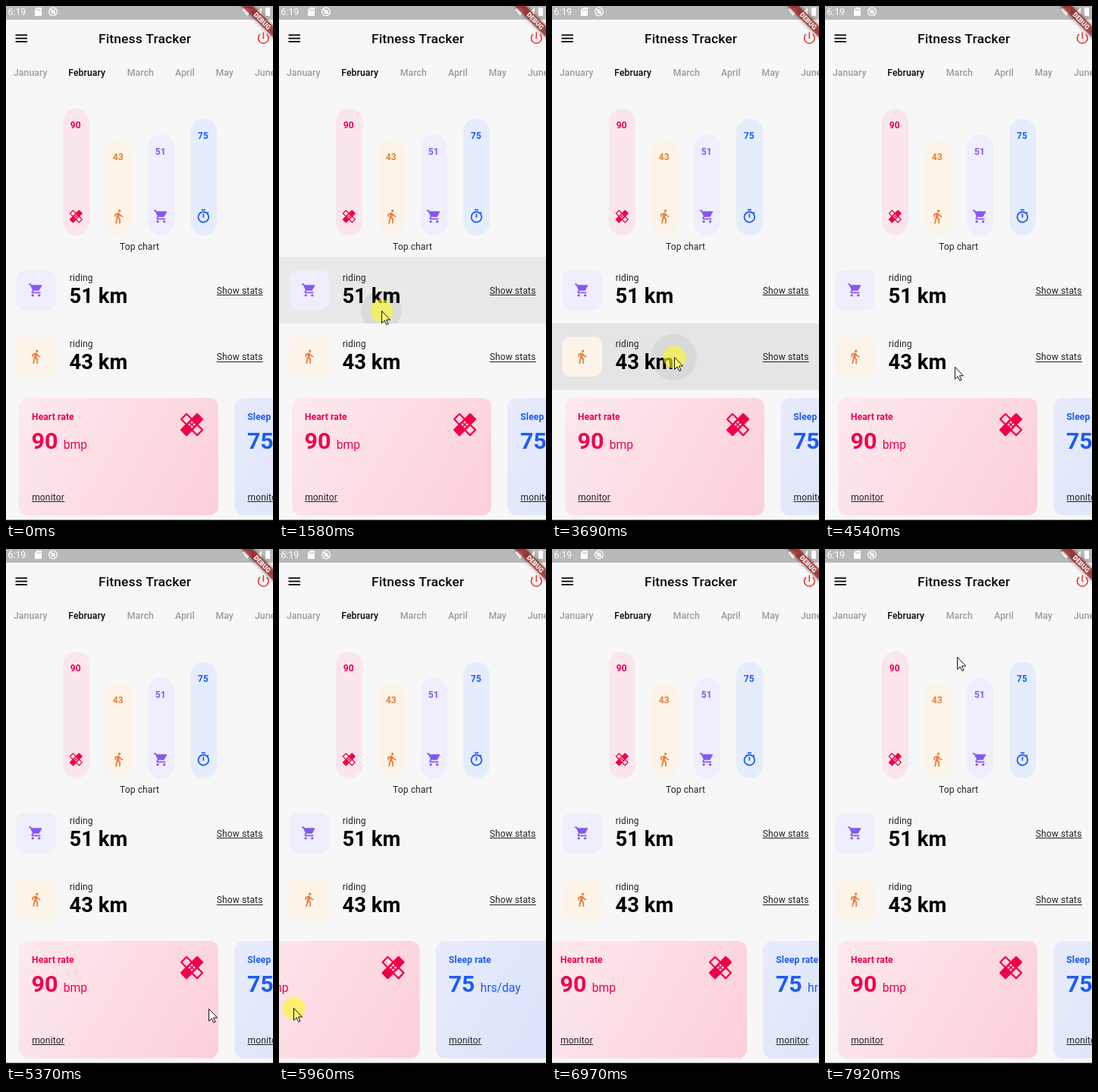
Write an HTML page with a canvas that moves like this. It is 352 px wide and 678 px high and loops after 7.99 s.

```html
<!DOCTYPE html>
<html lang="en">
<head>
<meta charset="utf-8">
<title>Fitness Tracker</title>
<style>
  html, body { margin: 0; width: 100%; height: 100%; overflow: hidden; background: #f7f7f7; }
  canvas { display: block; width: 352px; height: 678px; }
</style>
</head>
<body>
<canvas id="stage" width="352" height="678"></canvas>
<script>
const ctx = document.getElementById('stage').getContext('2d');
const LOOP = 7990;
const INK = '#222', RED = '#f00048', ORANGE = '#ee7f3b', PURPLE = '#8558ee', BLUE = '#1c5cf5';

const icons = {
  healing: new Path2D('M17.73 12.02l3.98-3.98a1 1 0 0 0 0-1.41l-4.34-4.34a1 1 0 0 0-1.41 0l-3.98 3.98L8 2.29a1 1 0 0 0-1.41 0L2.25 6.63a1 1 0 0 0 0 1.41l3.98 3.98L2.25 16a1 1 0 0 0 0 1.41l4.34 4.34a1 1 0 0 0 1.41 0l3.98-3.98 3.98 3.98a1 1 0 0 0 1.42 0l4.34-4.34a1 1 0 0 0 0-1.41zM7.29 10.96L3.66 7.34l3.63-3.63 3.62 3.62zM16.66 20.34l-3.63-3.62 3.63-3.63 3.62 3.62z'),
  walk: new Path2D('M13.5 5.5a2 2 0 1 0 0-4a2 2 0 0 0 0 4zM9.8 8.9L7 23h2.1l1.8-8 2.1 2v6h2v-7.5l-2.1-2 .6-3C14.8 12 16.8 13 19 13v-2c-1.9 0-3.5-1-4.3-2.4l-1-1.6c-.4-.6-1-1-1.7-1-.3 0-.5.1-.8.1L6 8.3V13h2V9.6z'),
  cart: new Path2D('M1 2v2h2l3.6 7.59-1.35 2.45A2 2 0 0 0 7 17h12v-2H7.42a.25.25 0 0 1-.22-.37l.9-1.63h7.45c.75 0 1.41-.41 1.75-1.03l3.58-6.49A1 1 0 0 0 20 4H5.21l-.94-2z'),
  timer: new Path2D('M15 1H9v2h6zM11 14h2V8h-2zM19.03 7.39l1.42-1.42c-.43-.51-.9-.99-1.41-1.41l-1.42 1.42A9 9 0 1 0 19.03 7.39zM12 20a7 7 0 1 1 0-14a7 7 0 0 1 0 14z'),
  power: new Path2D('M13 3h-2v10h2zM17.83 5.17l-1.42 1.42A7 7 0 1 1 7.58 6.58L6.17 5.17A9 9 0 1 0 17.83 5.17z')
};
const dots = (path, r, ...centres) => centres.forEach(([x, y]) => {
  path.moveTo(x + r, y);
  path.arc(x, y, r, 0, 7);
  path.closePath();
});
dots(icons.healing, 1, [12, 10], [12, 14], [10, 12], [14, 12]);
dots(icons.cart, 2, [7, 20], [17, 20]);

const bars = [
  { x: 75, y: 135, n: 90, bg: '#fce6ed', fg: RED, icon: 'healing' },
  { x: 131, y: 176.5, n: 43, bg: '#fcf4e9', fg: ORANGE, icon: 'walk' },
  { x: 187, y: 169.5, n: 51, bg: '#eeeefc', fg: PURPLE, icon: 'cart' },
  { x: 243, y: 148.5, n: 75, bg: '#e5edfc', fg: BLUE, icon: 'timer' }
];
const rows = [
  { y: 330.5, label: '51 km', bar: bars[2], press: { x: 135, y: 401.5, r: 221, down: 1460, up: 2780 } },
  { y: 418, label: '43 km', bar: bars[1], press: { x: 160.5, y: 462.5, r: 196, down: 3536, up: 4330 } }
];
const cards = [
  { x: 17, name: 'Heart rate', n: 90, unit: 'bmp', fg: RED, from: '#fce9ee', to: '#fccfda', icon: 'healing' },
  { x: 301.3, name: 'Sleep rate', n: 75, unit: 'hrs/day', fg: BLUE, from: '#e7ebfb', to: '#d5defa', icon: 'timer' }
];
const months = [['January', 10], ['February', 82.3], ['March', 159.7], ['April', 223], ['May', 276.5], ['June', 328]];

// Motion advances in bursts: [start, end, steps]
const bursts = [
  [250, 560, 6], [810, 1330, 9], [2810, 3260, 8], [4350, 4800, 8], [5180, 5960, 12],
  [6010, 6010, 1], [6390, 6510, 3], [6710, 7020, 6], [7520, 7920, 7]
];
const ease = {
  linear: u => u,
  in: u => u * u,
  out: u => u * (2 - u),
  both: u => u * u * (3 - 2 * u)
};
// Moves: [start, end, target, easing]; equal times mean a jump
const cursorMoves = [
  [250, 250, [291, 660]], [250, 560, [231, 517], 'out'],
  [750, 1270, [135, 401], 'both'],
  [2880, 3260, [161, 462], 'both'],
  [4400, 4800, [259, 589], 'both'],
  [5110, 5310, [267, 605], 'out'],
  [5480, 5960, [19, 604], 'in'], [6010, 6010, [-40, 604]],
  [6390, 6390, [0, 612]], [6390, 6510, [113, 613]],
  [6650, 6958, [352, 624], 'in'], [7020, 7020, [400, 624]],
  [7520, 7520, [327, 389]], [7520, 7920, [174, 142], 'out']
];
const scrollMoves = [
  [5620, 5960, [94.5], 'in'], [6010, 6010, [229]],
  [6650, 6958, [23], 'both'], [7020, 7020, [0]]
];
const holds = [[1330, 2810], [3440, 4350], [5450, 6010], [6650, 6900]];

const clamp = u => Math.min(1, Math.max(0, u));

function snap(t) {
  const burst = bursts.filter(b => b[0] <= t).pop();
  if (!burst) return 0;
  const [start, end, n] = burst;
  const dt = (end - start) / (n - 1) || 1;
  return start + Math.min(n - 1, Math.floor((t - start) / dt + 1e-6)) * dt;
}

function follow(moves, pos, t) {
  for (const [start, end, to, kind = 'linear'] of moves) {
    if (t < start) break;
    const u = end > start ? ease[kind](clamp((t - start) / (end - start))) : 1;
    pos = pos.map((v, i) => v + (to[i] - v) * u);
  }
  return pos;
}

function text(str, x, y, size, color, { weight = 400, spacing = 0.15, align = 'left' } = {}) {
  ctx.font = `${weight} ${size}px Roboto, sans-serif`;
  ctx.letterSpacing = spacing + 'px';
  ctx.textAlign = align;
  ctx.fillStyle = color;
  ctx.fillText(str, x, y);
}

function link(str, x, y, width) {
  text(str, x, y, 12, INK);
  ctx.fillRect(x, Math.round(y + 1.5), width, 1);
}

function box(x, y, w, h, r, fill) {
  ctx.fillStyle = fill;
  ctx.beginPath();
  ctx.roundRect(x, y, w, h, r);
  ctx.fill();
}

function disc(x, y, r, fill) {
  ctx.fillStyle = fill;
  ctx.beginPath();
  ctx.arc(x, y, r, 0, 7);
  ctx.fill();
}

function trace(points) {
  ctx.beginPath();
  points.forEach(([x, y]) => ctx.lineTo(x, y));
  ctx.closePath();
}

function poly(points, fill) {
  trace(points);
  ctx.fillStyle = fill;
  ctx.fill();
}

function icon(name, x, y, size, color) {
  ctx.save();
  ctx.translate(x - size / 2, y - size / 2);
  ctx.scale(size / 24, size / 24);
  ctx.fillStyle = color;
  ctx.fill(icons[name], 'evenodd');
  ctx.restore();
}

function drawStatus() {
  ctx.fillStyle = '#b9b9b9';
  ctx.fillRect(0, 0, 352, 18);
  text('6:19', 2.5, 12, 12.3, '#fff', { spacing: 0 });
  poly([[41, 2], [47, 2], [47, 13], [38, 13], [38, 5]], '#fff');
  ctx.fillStyle = '#b9b9b9';
  for (const x of [40.5, 42.5, 44.5]) ctx.fillRect(x, 4, 1, 2.5);
  ctx.strokeStyle = '#fff';
  ctx.lineWidth = 1.3;
  ctx.beginPath();
  ctx.arc(62, 7.5, 5.3, 0, 7);
  ctx.moveTo(64, 7.5);
  ctx.arc(62, 7.5, 2, 0, 7);
  ctx.moveTo(58.5, 4);
  ctx.lineTo(65.5, 11);
  ctx.stroke();
  ctx.fillStyle = '#fff';
  ctx.beginPath();
  ctx.moveTo(318, 13);
  ctx.lineTo(311, 4.5);
  ctx.quadraticCurveTo(318, -0.5, 325, 4.5);
  ctx.fill();
  poly([[337, 2], [337, 13], [326, 13]], '#fff');
  box(342, 2, 6, 11, 1, '#fff');
}

function drawHeader() {
  ctx.fillStyle = '#080808';
  for (const y of [37.4, 41.7, 46]) ctx.fillRect(12.5, y, 15.5, 1.8);
  text('Fitness Tracker', 122, 49, 17.4, '#080808', { weight: 500, spacing: 0.15 });
  icon('power', 339.3, 42.3, 20.5, '#ee3f48');
  for (const [name, x] of months) {
    text(name, x, 91.5, 12.2, name === 'February' ? '#080808' : '#9c9c9c', { weight: 500, spacing: 0.09 });
  }
}

function drawBanner() {
  ctx.save();
  ctx.translate(358.5, -1);
  ctx.rotate(Math.PI / 4);
  ctx.shadowColor = 'rgba(0,0,0,.8)';
  ctx.shadowBlur = 5;
  ctx.fillStyle = 'rgba(183,28,28,.63)';
  ctx.fillRect(-34.2, 24, 68.4, 10.3);
  ctx.shadowColor = 'transparent';
  text('DEBUG', 0, 32.2, 8.7, '#fff', { weight: 900, spacing: 0, align: 'center' });
  ctx.restore();
}

function drawChart() {
  for (const b of bars) {
    const mid = b.x + 17.3;
    box(b.x, b.y, 35, 302 - b.y, 17.5, b.bg);
    text(b.n, mid - 0.5, b.y + 26, 12, b.fg, { weight: 700, align: 'center' });
    icon(b.icon, mid, 277, 20.5, b.fg);
  }
  text('Top chart', 176, 320.5, 12, INK, { align: 'center' });
}

function drawPress(y, p, t) {
  if (t < p.down || t > p.up + 200) return;
  const held = Math.min(t, p.up) - p.down;
  const late = Math.max(0, t - p.up);
  const fade = 1 - late / 200;
  ctx.save();
  ctx.beginPath();
  ctx.rect(0, y, 352, 87.5);
  ctx.clip();
  ctx.fillStyle = `rgba(188,188,188,${0.4 * clamp(held / 200) * fade})`;
  ctx.fillRect(0, y, 352, 88);
  const r = Math.min(p.r, p.r * held / 1000 + late);
  disc(p.x, p.y, r, `rgba(198,198,198,${0.4 * fade})`);
  ctx.restore();
}

function drawRow({ y, label, bar, press }, t) {
  drawPress(y, press, t);
  box(13.3, y + 17.2, 52.8, 52.8, 12, bar.bg);
  icon(bar.icon, 39.5, y + 43.5, 20.5, bar.fg);
  text('riding', 83.7, y + 31.3, 12, INK);
  text(label, 83.5, y + 60, 27.4, '#000', { weight: 700, spacing: 0 });
  link('Show stats', 277.7, y + 48, 61);
}

function drawCard(c, scroll) {
  const x = c.x - scroll;
  const fill = ctx.createLinearGradient(x, 516, x + 263, 670);
  fill.addColorStop(0, c.from);
  fill.addColorStop(1, c.to);
  box(x, 516, 263, 154.5, 12, fill);
  text(c.name, x + 17, 545.3, 12.1, c.fg, { weight: 700, spacing: 0.1 });
  text(c.n, x + 16.6, 583, 30.4, c.fg, { weight: 700, spacing: 0 });
  text(c.unit, x + 58.7, 583, 15.7, c.fg, { spacing: 0 });
  link('monitor', x + 17.2, 650.6, 43);
  icon(c.icon, x + 228, 551, 36, c.fg);
}

function drawCursor(t, now) {
  const arrow = [[0, 0], [0, 16], [3.7, 12.5], [6.2, 18], [8.5, 17], [6, 11.5], [11, 11.5]];
  const [x, y] = follow(cursorMoves, [-50, 700], now);
  ctx.save();
  ctx.translate(x + 0.5, y + 0.5);
  poly(arrow, '#fff');
  if (holds.some(([on, off]) => t >= on && t < off)) disc(0, 0, 15, 'rgba(255,250,35,.6)');
  trace(arrow);
  ctx.strokeStyle = '#111';
  ctx.lineWidth = 1;
  ctx.stroke();
  ctx.restore();
}

function draw(t) {
  const now = snap(t);
  const [scroll] = follow(scrollMoves, [0], now);
  ctx.fillStyle = '#f7f7f7';
  ctx.fillRect(0, 0, 352, 678);
  drawStatus();
  drawHeader();
  drawChart();
  rows.forEach(row => drawRow(row, t));
  cards.forEach(card => drawCard(card, scroll));
  ctx.fillStyle = '#000';
  ctx.fillRect(0, 676.6, 352, 1.4);
  drawBanner();
  drawCursor(t, now);
}

const begin = performance.now();
function tick() {
  draw((performance.now() - begin) % LOOP);
  requestAnimationFrame(tick);
}
tick();
</script>
</body>
</html>
```
